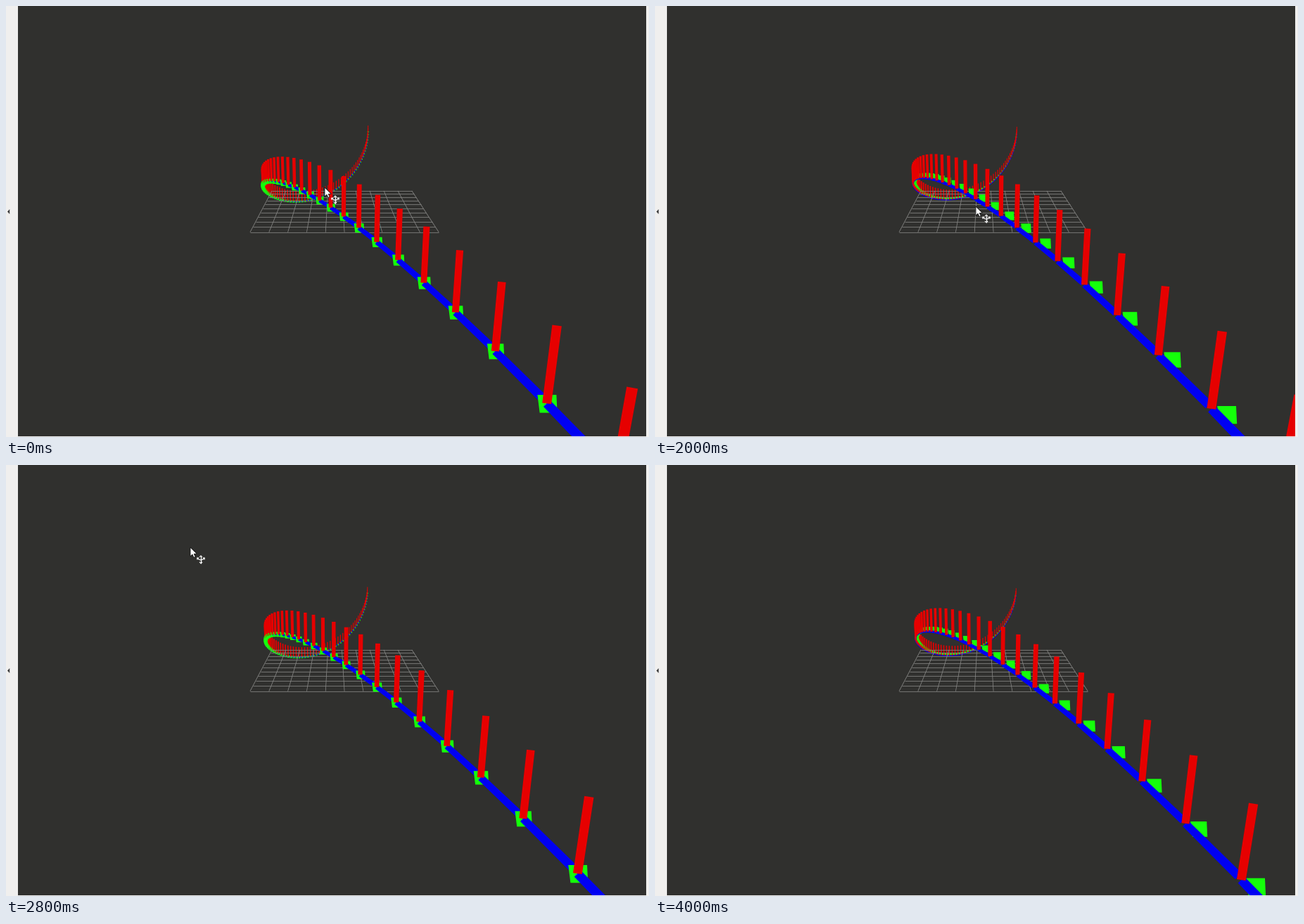
A matplotlib script that plays this animation: 914x613 px, repeating every 4.1 s.

```python
import numpy as np
import matplotlib.pyplot as plt
from matplotlib.animation import FuncAnimation
from matplotlib.collections import LineCollection, PolyCollection
from matplotlib.patches import Polygon, Rectangle

W, H, DPI = 914, 613, 100
PX = 72 / DPI

# Pinhole camera looking 16 degrees down
FOCAL, CX, CY = 739, 467, 306
COS, SIN = np.cos(np.radians(16)), np.sin(np.radians(16))

# Helix of poses running away from the camera, its axis slightly tilted
POSES = np.arange(80, -1, -1)
RADIUS, OMEGA, PHASE = 5.2, 0.0615, 6.55
STEP_ANGLE = 0.039
FLOOR = -8.157
BAR = 0.053

BACK, PANEL = "#30302e", "#f0efee"
RED, GREEN, BLUE = "#e60000", "#14ff0a", "#0000f2"

STATE_STARTS = (10, 21, 31)
LATE_FRAMES = (9, 20, 30, 40)  # green axes update one frame early
CURSOR_END = 32


def project(p):
    """World (right, forward, up) to screen points and depth."""
    x, fwd, up = p[..., 0], p[..., 1], p[..., 2]
    depth = fwd * COS - up * SIN
    lift = fwd * SIN + up * COS
    screen = np.stack([CX + FOCAL * x / depth, CY - FOCAL * lift / depth], -1)
    return screen, depth


def helix(i, state):
    angle = OMEGA * (i - PHASE) - STEP_ANGLE * state
    x = 0.73 - RADIUS * np.sin(angle) - 0.0057 * i
    up = -3.406 - RADIUS * (1 - np.cos(angle)) + 0.005 * i
    return np.stack([x, 4.22 + i, up], -1)


def bars(start, end):
    """Screen quads for round bars between two sets of world points."""
    a, za = project(start)
    b, zb = project(end)
    d = b - a
    n = np.stack([-d[:, 1], d[:, 0]], -1) / np.hypot(d[:, 0], d[:, 1])[:, None]
    na = n * (BAR * FOCAL / za)[:, None]
    nb = n * (BAR * FOCAL / zb)[:, None]
    return np.stack([a + na, b + nb, b - nb, a - na], 1)


def blocks(centre):
    c, z = project(centre)
    shape = np.array([[-0.108, -0.1], [0.112, -0.1], [0.122, 0.108], [-0.082, 0.108]])
    return c[:, None, :] + shape[None] * (FOCAL / z)[:, None, None]


def pose_quads(state, green_state):
    """Green, blue and red quads per pose, far to near, split at the floor."""
    base = helix(POSES, state)
    ahead = helix(POSES - 0.5, state) - helix(POSES + 0.5, state)
    ahead /= np.linalg.norm(ahead, axis=1)[:, None]
    red = bars(base, base + [0, 0, 1])
    blue = bars(base, base + ahead)
    green = blocks(helix(POSES, green_state))
    quads = np.stack([green, blue, red], 1)
    below = base[:, 2] < FLOOR
    return quads[below].reshape(-1, 4, 2), quads[~below].reshape(-1, 4, 2)


def grid_lines():
    lines = []
    for k in range(-5, 6):
        for ends in (((k, -5), (k, 5)), ((-5, k), (5, k))):
            pts = [(0.525 + u, 31.32 + v, FLOOR) for u, v in ends]
            lines.append(project(np.array(pts))[0])
    return lines


def cursor_at(n):
    keys = [0, 6, 7, 8, 9, 22, 23, 24, 25, 26, 27, 28, 29, 30, 31]
    xs = [453, 453, 454, 456, 456, 456, 437, 352, 295, 277, 266, 262, 246, 198, 87]
    ys = [258, 258, 270, 282, 285, 285, 265, 186, 140, 127, 120, 117, 108, 86, 22]
    return np.array([np.interp(n, keys, xs), np.interp(n, keys, ys)])


fig = plt.figure(figsize=(W / DPI, H / DPI), dpi=DPI, facecolor=BACK)
ax = fig.add_axes([0, 0, 1, 1])
ax.set_xlim(0, W)
ax.set_ylim(H, 0)
ax.axis("off")

axis_colors = [GREEN, BLUE, RED]
low = PolyCollection([], facecolors=axis_colors, edgecolors="none", zorder=1)
grid = LineCollection(grid_lines(), colors="#858583", linewidths=0.8 * PX, zorder=2)
high = PolyCollection([], facecolors=axis_colors, edgecolors="none", zorder=3)
for item in (low, grid, high):
    ax.add_collection(item)

# Window edges and the collapse arrow
for x, y, w, h in ((0, 0, 17, H), (910, 0, 4, H), (0, 612, W, 1)):
    ax.add_patch(Rectangle((x, y), w, h, color=PANEL, lw=0, zorder=5))
ax.add_patch(Polygon([(2, 292.5), (5.2, 289), (5.2, 296)], color="#3a3a3a", lw=0, zorder=6))

# Mouse pointer with its orbit icon
ARROW = np.array([(0, 0), (0, 13), (3, 10.3), (5, 14.6), (7.2, 13.6), (5.3, 9.5), (9.2, 9.2)])
bend = np.linspace(-1, 1, 9)
ICON = [
    np.stack([15 + 5 * bend, 18 - 2.5 * bend ** 2], -1),
    np.array([(15, 12.5), (15, 22.5)]),
    np.array([(13.2, 13.9), (15, 12.1), (16.8, 13.9)]),
    np.array([(13, 20.9), (15, 22.9), (17, 20.9)]),
    np.array([(10, 17.7), (9.8, 15.1), (12.2, 15.1)]),
    np.array([(20, 17.7), (20.2, 15.1), (17.8, 15.1)]),
]
arrow = Polygon(ARROW, facecolor="white", edgecolor="#111111", lw=0.8 * PX, zorder=7)
icon = LineCollection([], colors="white", linewidths=1.2 * PX, zorder=7)
ax.add_patch(arrow)
ax.add_collection(icon)


def draw(n):
    state = sum(n >= start for start in STATE_STARTS)
    below, above = pose_quads(state, state + (n in LATE_FRAMES))
    low.set_verts(below)
    high.set_verts(above)
    pos = cursor_at(n)
    arrow.set_xy(ARROW + pos)
    icon.set_segments([s + pos for s in ICON])
    for part in (arrow, icon):
        part.set_visible(n < CURSOR_END)
    return low, high, arrow, icon


anim = FuncAnimation(fig, draw, frames=41, interval=100, repeat=True, repeat_delay=0, blit=False)
plt.show()
```
